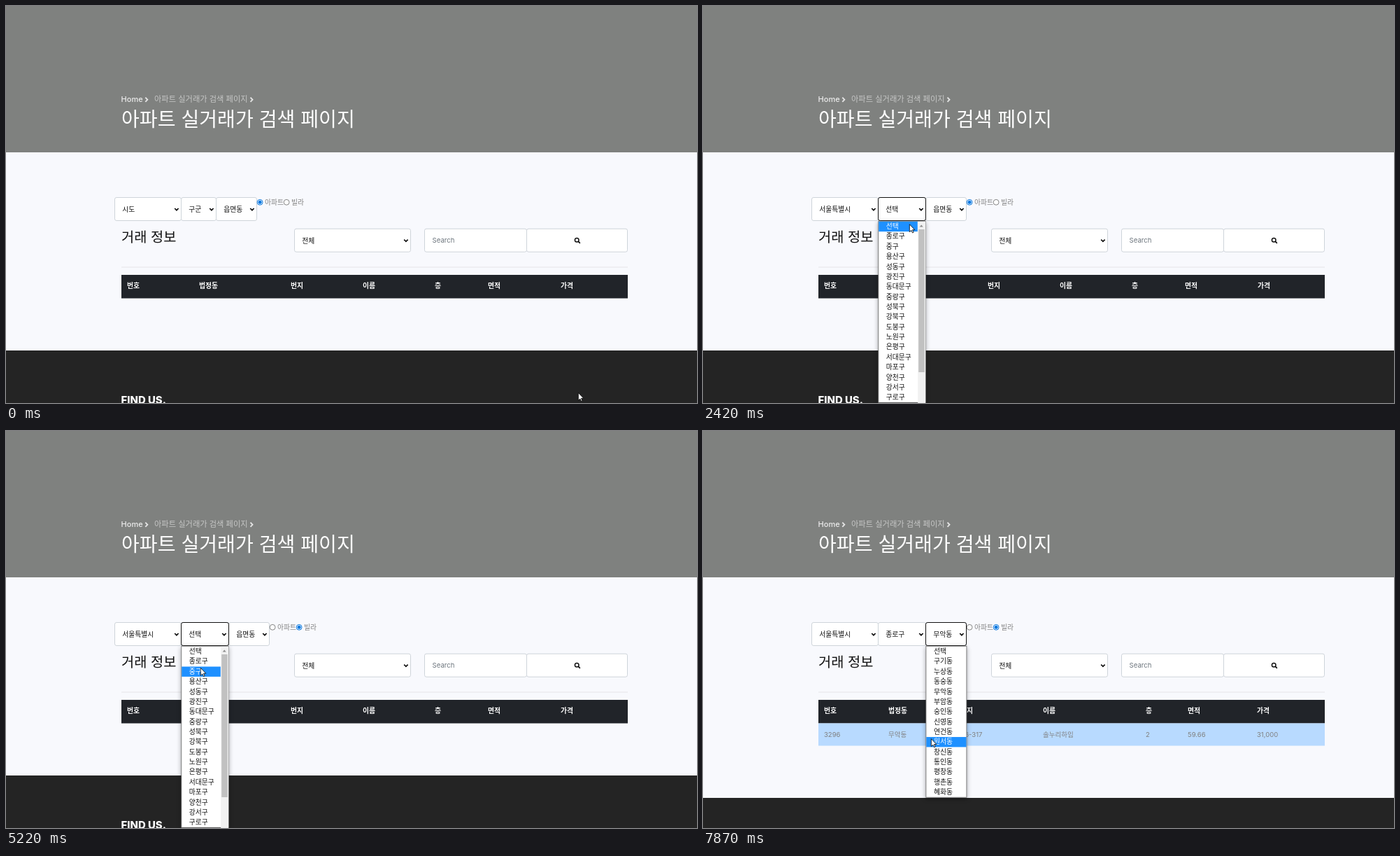
An HTML page that plays this animation: 988 by 567 pixels, repeating every 8 s.

```html
<!DOCTYPE html>
<html lang="ko">
<head>
<meta charset="utf-8">
<title>아파트 실거래가 검색</title>
<style>
  html, body { margin: 0; width: 100%; height: 100%; overflow: hidden; background: #f8f9fd; }
  svg { display: block; width: 988px; height: 567px; }
  text { font: 9.8px "Noto Sans CJK KR", "Noto Sans CJK", sans-serif; fill: #111; white-space: pre; }
  .lat { font-family: Inter, "Noto Sans CJK KR", sans-serif; font-size: 9.3px; }
  .th { font-weight: 700; fill: #fff; }
  .white { fill: #fff; }
  .thin { font-weight: 300; }
  .gray { fill: #808080; }
  .box { fill: #fff; stroke: #ced4da; }
  .focus { fill: none; stroke: #111; }
  .arrow { fill: none; stroke: #111; stroke-width: 1.7; }
  .popup { fill: #fff; stroke: #666; stroke-width: .8; filter: drop-shadow(0 2px 3px rgba(0, 0, 0, .35)); }
  .hot { fill: #1e90ff; }
</style>
</head>
<body>
<svg id="stage" viewBox="0 0 988 567"></svg>
<script>
const LOOP = 8000, STEP = 77, TOP = 307.8, ROW = 14.36;

const label = (x, mid, s, cls = '', size = 9.8) =>
  `<text x="${x}" y="${mid + size * .37}" class="${cls}" style="font-size:${size}px">${s}</text>`;
const frame = (x, y, w, cls) => `<rect x="${x}" y="${y}" width="${w}" height="33" rx="2.6" class="${cls}"/>`;
const select = (x, y, w, s = '') =>
  frame(x, y, w, 'box') + label(x + 10.8, y + 16.7, s) +
  `<path class="arrow" d="M${x + w - 9.3} ${y + 15.5}l2.7 2.7 2.7-2.7"/>`;
const chevron = x => `<path d="M${x} 130.7l3 3.1-3 3.1" fill="none" stroke="#e4e4e4" stroke-width="1.9"/>`;

// shows its body while the number of finished clicks lies in one of the ranges
const on = (steps, body) => `<g data-on="${steps}">${body}</g>`;

const radio = (x, picked, empty, s) =>
  on(empty, `<circle cx="${x}" cy="280.3" r="3.9" fill="#fff" stroke="#767676" stroke-width=".9"/>`) +
  on(picked, `<circle cx="${x}" cy="280.3" r="3.9" fill="#fff" stroke="#0a78e0"/>
    <circle cx="${x}" cy="280.3" r="2.5" fill="#0a78e0"/>`) +
  label(x + 7, 280.8, s, 'gray');

const scrollbar = x => `
  <rect x="${x}" y="${TOP}" width="11" height="262" fill="#f1f1f1"/>
  <rect x="${x + 1}" y="319" width="8.5" height="204" fill="#c1c1c1"/>
  <path d="M${x + 2.5} 315.4l2.5-2.8 2.5 2.8z" fill="#8a8a8a"/>`;

const popup = (x, w, steps, names, bar = 0) => {
  const items = names.split(' ');
  return `<g class="menu" data-on="${steps}">
    <rect class="popup" x="${x}" y="307.2" width="${w}" height="${items.length * ROW + .6}"/>
    <rect class="hot" x="${x + .4}" width="${w - bar - .8}" height="${ROW}"/>
    ${bar ? scrollbar(x + w - bar) : ''}
    ${items.map((s, i) => label(x + 11, TOP + ROW * (i + .5) - .5, s)).join('')}</g>`;
};

// heading, x when empty, x when filled, value
const columns = [
  ['번호', 173, 173, '3296'], ['법정동', 276, 265, '무악동'], ['번지', 407, 368, '46-317'],
  ['이름', 510, 486, '솔누리하임'], ['층', 613, 633, '2'], ['면적', 689, 693, '59.66'], ['가격', 793, 792, '31,000']
];
const heads = k => columns.map(c => label(c[k], 399.8, c[0], 'th')).join('');
const values = columns.map(c => label(c[2], 433.3, c[3], /\d/.test(c[3]) ? 'gray lat' : 'gray', 9.5)).join('');

const title = '아파트 실거래가 검색 페이지';
const stage = document.getElementById('stage');
stage.innerHTML = `
  <rect width="988" height="567" fill="#f8f9fd"/>
  <rect width="988" height="209" fill="#7f817f"/>
  <text x="164.6" y="137.2" class="lat" style="font-size:11px;font-weight:500;fill:#ececec">Home</text>
  ${chevron(199.3)}${chevron(349.5)}
  <g opacity=".55">${label(212, 133.2, title, 'white', 11.25)}</g>
  ${label(165, 161.4, title, 'white', 28.1)}

  ${select(155.5, 273.5, 95)}
  ${on('0-1', label(166.3, 290.2, '시도'))}
  ${on('2-10', label(166.3, 290.2, '서울특별시'))}
  ${on('0-1', select(250.5, 273.5, 50, '구군'))}
  ${on('2-10', select(250.5, 273.5, 68))}
  ${on('2-6', label(261.3, 290.2, '선택'))}
  ${on('7-10', label(261.3, 290.2, '종로구'))}
  <g id="side">
    ${select(300.5, 273.5, 58)}
    ${on('0-6', label(311.3, 290.2, '읍면동'))}
    ${on('7-8', label(311.3, 290.2, '선택'))}
    ${on('9-10', label(311.3, 290.2, '무악동'))}
    ${radio(363.1, '0-4', '5-10', '아파트')}${radio(401.1, '5-10', '0-4', '빌라')}
  </g>
  ${on('1-2', frame(155.5, 273.5, 95, 'focus'))}
  ${on('3-3 6-7', frame(250.5, 273.5, 68, 'focus'))}
  ${on('8-10', frame(318.5, 273.5, 58, 'focus'))}

  ${label(165, 330, '거래 정보', 'thin', 19.8)}
  ${select(412.5, 318.2, 166, '전체')}
  ${frame(598.5, 318.2, 146, 'box')}${frame(744.5, 318.2, 144, 'box')}
  <text x="609.6" y="338.2" class="lat" style="fill:#6c757d;font-size:9.6px">Search</text>
  <g fill="none" stroke="#111"><circle cx="816.2" cy="334.2" r="2.8" stroke-width="1.5"/>
    <path d="M818.2 336.2l2.6 2.6" stroke-width="1.8"/></g>
  <path d="M165 373h724" stroke="#e1e2e6" stroke-width=".9"/>
  <rect x="165" y="384" width="724" height="33.5" fill="#212429"/>
  ${on('0-8', heads(1))}
  ${on('9-10', heads(2) + '<rect x="165" y="417.5" width="724" height="32" fill="#b8daff"/>' + values)}

  <g id="foot"><rect y="492" width="988" height="120" fill="#242424"/>
    <text x="164.6" y="568.3" class="lat" style="font-size:14.9px;font-weight:800;fill:#fff">FIND US.</text></g>

  ${popup(155.5, 95, '1-1', '시도 서울특별시 부산광역시 대구광역시 인천광역시 광주광역시 대전광역시 울산광역시 ' +
    '세종특별자치시 경기도 강원도 충청북도 충청남도 전라북도 전라남도 경상북도 경상남도 제주특별자치도')}
  ${popup(250.8, 67.4, '3-3 6-6', '선택 종로구 중구 용산구 성동구 광진구 동대문구 중랑구 성북구 강북구 도봉구 ' +
    '노원구 은평구 서대문구 마포구 양천구 강서구 구로구', 11)}
  ${popup(318.9, 58, '8-8 10-10', '선택 구기동 누상동 동숭동 무악동 부암동 숭인동 신영동 연건동 원서동 창신동 ' +
    '통인동 평창동 행촌동 혜화동')}

  <g id="mouse">
    <circle id="ring" r="8" cy=".5" fill="#ffec00" fill-opacity=".7"/>
    <path id="hand" d="M.3.4V11.3L2.8 9 4.5 12.6 6.1 11.9 4.5 8.3H7.8Z" fill="#fff" stroke="#000" stroke-width=".8"/>
    <path id="beam" d="M-1.5-2.4H2.5M.5-2.4V5M-1.5 5H2.5" fill="none" stroke="#333" stroke-width=".9"/>
  </g>`;

// release time of each click
const clicks = [925, 1615, 2015, 2865, 3815, 4755, 5370, 5760, 6365, 7470];

// pointer moves: start, end, then points passed at equal intervals
const option = (x, row) => [x, TOP + ROW * row];
const rest = [818, 552], sido = [201, 283], seoul = option(218, 1.93), gugun = [279, 292], first = option(281, 1.5),
  villa = [421, 279], dong = [346, 292], picked = option(353, 4.92), edge = [320, 288];
const moves = [
  [70, 450, sido],
  [850, 1390, sido, seoul],
  [1540, 2340, seoul, gugun, gugun, option(295, .25)],
  [2420, 2490, option(296, 1.1)],
  [2640, 3340, [440, 264], [536, 284], [420, 288]],
  [3510, 3900, villa, villa],
  [4050, 4540, gugun],
  [4690, 4910, option(278, 2.1)],
  [5220, 6000, first, first, dong, dong, option(352, 3.5)],
  [6060, 6140, picked],
  [6290, 7090, picked, [354, 297]],
  [7170, 7250, edge],
  [7400, 7870, edge, edge, option(326, 9.15)]
];

// the screen refreshes in even steps during a move and rests in between
const sample = t => {
  const i = moves.findLastIndex(m => m[0] <= t);
  if (i < 0) return { t: 0, x: rest[0], y: rest[1] };
  const [from, to, ...points] = moves[i];
  const count = Math.round((to - from) / STEP);
  const p = Math.min(1, Math.floor((t - from) / (to - from) * count + 1e-6) / count);
  const path = [i ? moves[i - 1].at(-1) : rest, ...points];
  const k = Math.min(points.length - 1, Math.floor(p * points.length));
  const u = p * points.length - k, e = u * u * (3 - 2 * u);
  const [x, y] = path[k].map((v, axis) => v + (path[k + 1][axis] - v) * e);
  return { t: from + p * (to - from), x, y };
};

const parts = [...stage.querySelectorAll('[data-on]')].map(el => ({
  el, ranges: el.dataset.on.split(' ').map(s => s.split('-').map(Number))
}));
const menus = [...stage.querySelectorAll('.menu')].map(g => ({
  bar: g.querySelector('.hot'), rows: [...g.querySelectorAll('text')]
}));
const [side, foot, mouse, ring, hand, beam] =
  ['side', 'foot', 'mouse', 'ring', 'hand', 'beam'].map(id => document.getElementById(id));
const show = (el, yes) => el.style.display = yes ? '' : 'none';

function draw(time) {
  const { t, x, y } = sample(time);
  const step = clicks.filter(c => c <= t).length;
  for (const { el, ranges } of parts) show(el, ranges.some(([a, b]) => step >= a && step <= b));
  side.setAttribute('transform', `translate(${step < 2 ? 0 : 18})`);
  foot.setAttribute('transform', `translate(0 ${step < 9 ? 0 : 32})`);
  mouse.setAttribute('transform', `translate(${x} ${y})`);
  const overText = step === 2 && x < 243 && y > 320;
  show(ring, clicks.some(c => t >= c - 78 && t < c));
  show(hand, !overText);
  show(beam, overText);
  for (const { bar, rows } of menus) {
    const hot = y < TOP ? (step < 9 ? 0 : 4) : Math.min(rows.length - 1, Math.floor((y - TOP) / ROW));
    bar.setAttribute('y', TOP + hot * ROW);
    rows.forEach((r, i) => r.style.fill = i === hot ? '#fff' : '');
  }
}

const start = performance.now();
(function tick() {
  draw((performance.now() - start) % LOOP);
  requestAnimationFrame(tick);
})();
</script>
</body>
</html>
```
